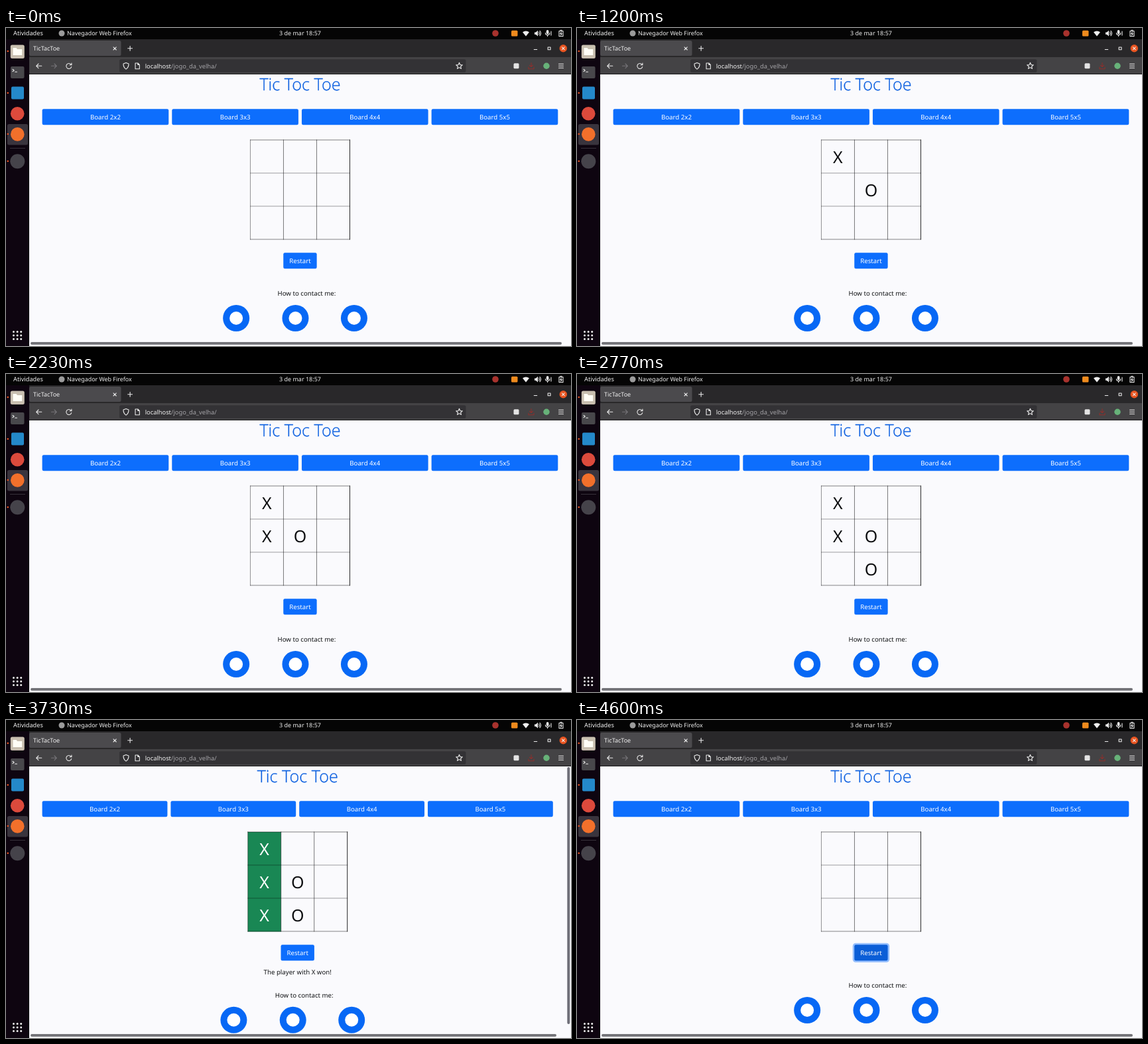
An HTML page for the animation above (4630 ms loop, 852 px wide and 480 px high).

```html
<!DOCTYPE html>
<html lang="pt">
<head>
<meta charset="utf-8">
<title>TicTacToe</title>
<style>
html, body { margin: 0; width: 100%; height: 100%; overflow: hidden; background: #fafafd; }
svg { display: block; width: 100vw; height: 100vh; }
text { font-family: "Noto Sans", "Open Sans", sans-serif; font-size: 9.66px; text-rendering: geometricPrecision; white-space: pre; }
.bar { font-size: 9px; fill: #f0f0f0; }
.mid { text-anchor: middle; }
.title { font-family: "Open Sans", "Noto Sans", sans-serif; font-size: 25.2px; font-weight: 300; fill: #0b5fe0; stroke: #0b5fe0; stroke-width: .3; }
.mark { font-size: 25px; }
.icon { fill: none; stroke: #ececec; stroke-width: 1.1; stroke-linecap: round; stroke-linejoin: round; }
</style>
</head>
<body>
<svg id="stage" viewBox="0 0 852 480" xmlns="http://www.w3.org/2000/svg">
  <rect width="852" height="480" fill="#fafafd"/>

  <g id="page">
    <text class="title mid" id="title" y="94.3">Tic Toc Toe</text>
    <g id="sizes"></g>
    <g id="board">
      <rect id="win" x="-75" y="169" width="50" height="150.5" fill="#198754"/>
      <g id="grid"></g>
      <g id="marks"></g>
      <rect id="ring" x="-27.7" y="336.7" width="55.4" height="29" rx="4.5" fill="#3184fd"/>
      <rect id="restart" x="-25.2" y="339.2" width="50.4" height="24" rx="2.3"/>
      <text class="mid" y="354.8" fill="#fff">Restart</text>
      <text class="mid" id="message" y="384" fill="#101214">The player with X won!</text>
      <g id="contact">
        <text class="mid" x="10" y="404" fill="#101214">How to contact me:</text>
        <g id="links"></g>
      </g>
    </g>
    <rect id="hbar" x="37" y="474" height="4" rx="2" fill="#75757a"/>
    <rect id="vbar" x="846.3" y="71" width="4" height="388" rx="2" fill="#6e6e78"/>
  </g>

  <!-- top bar -->
  <rect width="852" height="17" fill="#050505"/>
  <text class="bar" x="11" y="11.4" style="font-size:9.26px">Atividades</text>
  <circle cx="84" cy="8" r="4.5" fill="#9b9b9b"/>
  <text class="bar" x="92" y="11.4" style="font-size:8.9px">Navegador Web Firefox</text>
  <text class="bar" x="412" y="11.4">3 de mar 18:57</text>
  <circle cx="738" cy="8" r="4.8" fill="#a8322d"/>
  <rect x="762" y="3.8" width="9.5" height="8.6" rx="1.5" fill="#ee8a1d"/>
  <path d="M779 6.3Q784 2.6 789 6.3L784 12.4Z" fill="#eee"/>
  <path d="M797 6.4h2l3-2.6v8.6l-3-2.6h-2z" fill="#eee"/>
  <path class="icon" d="M803.5 6q1.6 2 0 4M805 4.4q3 3.6 0 7.2"/>
  <rect x="814.8" y="3" width="3.6" height="6.2" rx="1.8" fill="#eee"/>
  <path class="icon" d="M813.4 7.6q0 3 3.2 3t3.2-3M816.6 10.6v2M822 5v6" stroke-width=".9"/>
  <path class="icon" d="M834 4.5h6v8h-6zM836 3.2h2M837.6 6l-1.8 2.6h2.4L836.6 11"/>

  <!-- tab strip -->
  <rect x="35" y="17" width="817" height="27" fill="#29282a"/>
  <rect x="35" y="19" width="138.5" height="23" rx="2.5" fill="#4b4a4d"/>
  <text class="bar" x="41" y="34.2">TicTacToe</text>
  <path class="icon" d="M162 28.8l4.2 4.2m0-4.2L162 33M183.7 30.8h6.8M187.1 27.4v6.8M796.3 32.5h4.4M817.2 29h3.8v3.8h-3.8z"/>
  <circle cx="840.3" cy="30.8" r="5.7" fill="#e95420"/>
  <path class="icon" d="M838.4 28.9l3.8 3.8m0-3.8l-3.8 3.8"/>

  <!-- address bar -->
  <rect x="35" y="44" width="817" height="26" fill="#444345"/>
  <rect x="35" y="69" width="817" height="1" fill="#151515"/>
  <rect x="171" y="47.3" width="522.5" height="19.7" rx="2.5" fill="#333235"/>
  <path class="icon" d="M53.8 57.3h-8m3.2-3.3l-3.3 3.3 3.3 3.3"/>
  <path class="icon" d="M68.5 57.3h7.5m-3-3.3l3.3 3.3-3.3 3.3" style="stroke:#77767a"/>
  <path class="icon" d="M98 55a4 4 0 1 0 .7 3.6M98.9 53v2.7h-2.8"/>
  <path class="icon" d="M181 52.6l4 1.5q.2 5.4-4 8-4.2-2.6-4-8z"/>
  <path class="icon" d="M195 53h3.8l2.5 2.5v6.2H195zM198.8 53v2.5h2.5"/>
  <text class="bar" x="209.7" y="60.5" style="font-size:9.3px">localhost<tspan fill="#a4a3a7">/jogo_da_velha/</tspan></text>
  <path id="star" class="icon"/>
  <rect x="765.5" y="53.3" width="8" height="8" rx="1.5" fill="#e4e4e4"/>
  <path class="icon" d="M792 52.6v6m-2.6-2.5l2.6 2.6 2.6-2.6M788 59v2.7h8V59" style="stroke:#8d302d"/>
  <circle cx="815" cy="57.3" r="4.7" fill="#67b279"/>
  <path class="icon" d="M833.5 54.3h7m-7 3h7m-7 3h7"/>

  <!-- launcher -->
  <rect y="17" width="35" height="463" fill="#0e0510"/>
  <rect x="2" y="145" width="31" height="31.5" rx="2.5" fill="#39343d"/>
  <rect x="6.8" y="25.5" width="21" height="20.5" rx="2.5" fill="#c9bfb0"/>
  <path d="M10.5 30h5l1.5 2h7.2v9H10.5z" fill="#fffdf6"/>
  <rect x="7" y="58" width="20.5" height="18" rx="2" fill="#48474b"/>
  <path class="icon" d="M10 62.3l2.2 1.7-2.2 1.7M13.7 66.2h2.8" stroke-width=".9"/>
  <rect x="8" y="88.5" width="19" height="19" rx="2" fill="#2489ca"/>
  <circle cx="17.2" cy="129.3" r="10.3" fill="#dc4a3c"/>
  <circle cx="17.3" cy="160.4" r="10.3" fill="#f2702b"/>
  <rect x="6" y="181" width="23" height="1" fill="#37323a"/>
  <circle cx="17.3" cy="201.3" r="11" fill="#45434a"/>
  <g id="dots"></g>
</svg>
<script>
const LOOP = 4630;
const WIN = 3500, HOVER = 4000, PRESS = 4270, RESET = 4340;
const FADE = 150;
const LEFT = 54.6, GAP = 5;
const BLUE = [13, 110, 253], DARK_BLUE = [11, 94, 215];
// time, symbol, column, row
const MOVES = [
  [270, "X", 0, 0], [1200, "O", 1, 1], [2000, "X", 0, 1],
  [2500, "O", 1, 2], [WIN, "X", 0, 2]
];

const el = id => document.getElementById(id);

function add(parent, tag, attrs, label) {
  const node = document.createElementNS("http://www.w3.org/2000/svg", tag);
  set(node, attrs);
  if (label) node.textContent = label;
  return el(parent).appendChild(node);
}

function set(node, attrs) {
  for (const key in attrs) node.setAttribute(key, attrs[key]);
}

function show(node, on) {
  node.setAttribute("visibility", on ? "visible" : "hidden");
}

const sizes = [2, 3, 4, 5].map(n => ({
  box: add("sizes", "rect", { y: 122.3, height: 24, rx: 2.3, fill: "#0d6efd" }),
  label: add("sizes", "text", { class: "mid", y: 137.8, fill: "#fff" }, `Board ${n}x${n}`)
}));

const rowInk = [0.5, 0.38, 0.38, 0.48], columnInk = [0.42, 0.52, 0.52, 0.85];
for (let i = 0; i < 4; i++) {
  add("grid", "rect", { x: -75.5, y: 168.5 + 50 * i, width: 151, height: 1, "fill-opacity": rowInk[i] });
  add("grid", "rect", { x: -75.5 + 50 * i, y: 168.5, width: 1, height: 151, "fill-opacity": columnInk[i] });
}

const marks = MOVES.map(([, symbol, col, row]) =>
  add("marks", "text", { class: "mark mid", x: -50 + 50 * col, y: 204 + 50 * row }, symbol));

[-96.3, -7, 81.5].forEach(x => {
  add("links", "circle", { cx: x, cy: 438, r: 20, fill: "#0768f5" });
  add("links", "circle", { cx: x, cy: 438, r: 10, fill: "#fff" });
});

for (let i = 0; i < 9; i++) {
  add("dots", "circle", { cx: 11.5 + 5.6 * (i % 3), cy: 458.5 + 5.5 * Math.floor(i / 3), r: 1.5, fill: "#f0f0f0" });
}
[35, 98, 160, 201].forEach(y => add("dots", "circle", { cx: 2.8, cy: y, r: 1.3, fill: "#e95420" }));

el("star").setAttribute("d", "M" + Array.from({ length: 10 }, (_, i) => {
  const a = Math.PI * (i / 5 - 0.5), r = i % 2 ? 2.3 : 5;
  return `${683.5 + r * Math.cos(a)} ${57.3 + r * Math.sin(a)}`;
}).join("L") + "Z");

const fade = (t, start) => {
  const p = Math.min(1, Math.max(0, (t - start) / FADE));
  return p * p * (3 - 2 * p);
};

// A vertical scrollbar narrows the page while the result is shown.
function draw(t) {
  const won = t >= WIN && t < RESET;
  const right = won ? 824.8 : 832.3;
  const center = (LEFT + right) / 2;
  const width = (right - LEFT - 3 * GAP) / 4;

  el("title").setAttribute("x", center);
  sizes.forEach(({ box, label }, i) => {
    const x = LEFT + i * (width + GAP);
    set(box, { x, width });
    set(label, { x: x + width / 2 });
  });

  el("board").setAttribute("transform", `translate(${center} 0)`);
  el("contact").setAttribute("transform", `translate(0 ${won ? 14.8 : 0})`);
  show(el("win"), won);
  show(el("message"), won);
  show(el("vbar"), won);
  el("hbar").setAttribute("width", won ? 793 : 801);

  MOVES.forEach(([time, symbol], i) => {
    show(marks[i], t >= time && t < RESET);
    marks[i].setAttribute("fill", won && symbol === "X" ? "#fff" : "#0c0d0f");
  });

  const hover = fade(t, HOVER);
  const shade = BLUE.map((c, i) => Math.round(c + (DARK_BLUE[i] - c) * hover));
  el("restart").setAttribute("fill", `rgb(${shade})`);
  el("ring").setAttribute("opacity", 0.5 * fade(t, PRESS));
}

let start;
function tick(now) {
  if (start === undefined) start = now;
  draw((now - start) % LOOP);
  requestAnimationFrame(tick);
}
draw(0);
requestAnimationFrame(tick);
</script>
</body>
</html>
```
